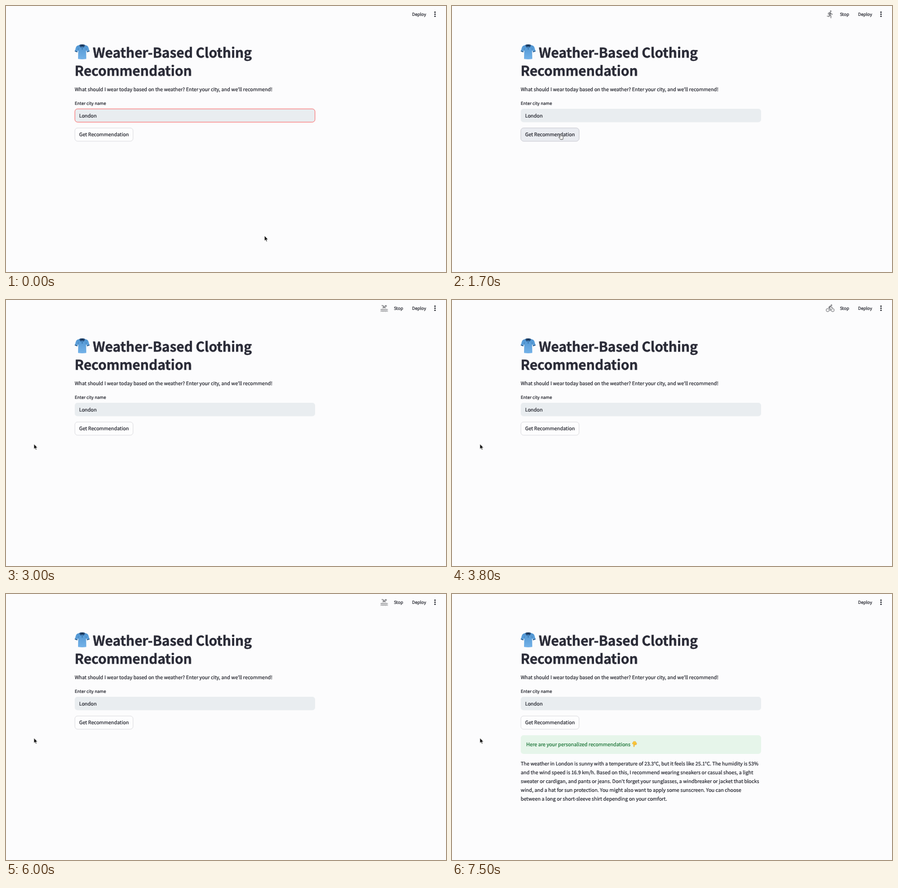
These frames come from a looping animation (800 by 484 pixels, 8000 ms). An HTML page:

```html
<!DOCTYPE html>
<html lang="en">
<head>
<meta charset="utf-8">
<title>Clothing Recommendation</title>
<style>
  html, body { margin: 0; width: 100%; height: 100%; overflow: hidden; background: #fcfcfd; }
  svg { display: block; width: 800px; height: 484px; }
  text {
    font: 8.91px "Noto Sans CJK JP", "Noto Sans CJK SC", "Noto Sans CJK", "Open Sans", sans-serif;
    fill: #1f2029;
    stroke: #1f2029;
    stroke-width: .2px;
    text-rendering: geometricPrecision;
    white-space: pre;
  }
  .title text {
    font-size: 24.6px; font-weight: 700; letter-spacing: -.005em;
    fill: #292a36; stroke: #292a36; stroke-width: .4px;
  }
  .small { font-size: 7.8px; }
  .note { fill: #177233; stroke: #177233; }

  /* One loop is 8 s, so 1% is 80 ms. */
  .focus, .press, .busy, .result, .arrow, .hand { animation: 8s step-end infinite; }
  .focus { animation-name: focus; }
  .press, .hand { animation-name: over; }
  .arrow { animation-name: away; }
  .busy { animation-name: busy; }
  .result { animation-name: result; }
  .pointer { animation: move 8s infinite; }
  .icon { fill: #707175; animation: flash .5s step-end calc(var(--slot) * 100ms - 530ms) infinite; }

  @keyframes focus { 0% { opacity: 1 } 15.9%, 100% { opacity: 0 } }
  @keyframes over { 0% { opacity: 0 } 12.5% { opacity: 1 } 26.7%, 100% { opacity: 0 } }
  @keyframes away { 0% { opacity: 1 } 12.5% { opacity: 0 } 26.7%, 100% { opacity: 1 } }
  @keyframes busy { 0% { opacity: 0 } 19.6% { opacity: 1 } 88.4%, 100% { opacity: 0 } }
  @keyframes result { 0% { opacity: 0 } 88.4%, 100% { opacity: 1 } }
  @keyframes flash { 0% { opacity: 1 } 20%, 100% { opacity: 0 } }
  @keyframes move {
    0%, 1.25% { transform: translate(470px, 418px); animation-timing-function: ease-in-out }
    14.4%, 22.5% { transform: translate(196.5px, 233px); animation-timing-function: ease-in-out }
    31.25%, 100% { transform: translate(50.8px, 262px) }
  }
</style>
</head>
<body>
<svg viewBox="0 0 800 484">
  <defs>
    <linearGradient id="cloth" x1="0" y1="0" x2="0" y2="1">
      <stop offset="0" stop-color="#4f95d2"/>
      <stop offset="1" stop-color="#74b2e8"/>
    </linearGradient>
    <path id="bike" d="M15.5 5.5c1.1 0 2-.9 2-2s-.9-2-2-2-2 .9-2 2 .9 2 2 2zM5 12c-2.8 0-5 2.2-5 5s2.2 5 5 5 5-2.2 5-5-2.2-5-5-5zm0 8.5c-1.9 0-3.5-1.6-3.5-3.5s1.6-3.5 3.5-3.5 3.5 1.6 3.5 3.5-1.6 3.5-3.5 3.5zm5.8-10l2.4-2.4.8.8c1.3 1.3 3 2.1 5.1 2.1V9c-1.5 0-2.7-.6-3.6-1.5l-1.9-1.9c-.5-.4-1-.6-1.6-.6s-1.1.2-1.4.6L7.8 8.4c-.4.4-.6.9-.6 1.4 0 .6.2 1.1.6 1.4L11 14v5h2v-6.2l-2.2-2.3zM19 12c-2.8 0-5 2.2-5 5s2.2 5 5 5 5-2.2 5-5-2.2-5-5-5zm0 8.5c-1.9 0-3.5-1.6-3.5-3.5s1.6-3.5 3.5-3.5 3.5 1.6 3.5 3.5-1.6 3.5-3.5 3.5z"/>
    <path id="wave" d="M2 17c1.7 0 1.7-1 3.3-1s1.7 1 3.4 1 1.6-1 3.3-1 1.7 1 3.3 1 1.7-1 3.4-1 1.6 1 3.3 1" fill="none" stroke="#707175" stroke-width="1.9"/>
  </defs>

  <!-- Toolbar -->
  <text class="small" x="738.3" y="18">Deploy</text>
  <g fill="#1f2029">
    <circle cx="780" cy="11.3" r="1.3"/>
    <circle cx="780" cy="15" r="1.3"/>
    <circle cx="780" cy="18.7" r="1.3"/>
  </g>
  <g class="busy">
    <text class="small" x="705.2" y="18">Stop</text>
    <g transform="translate(679.8 7.2) scale(.65)">
      <g class="icon" style="--slot:0">
        <circle cx="16.5" cy="5.5" r="2.5"/>
        <path d="M10 8l-3.25 3.25c.31.12.56.27.77.39.37.23.59.36 1.15.36s.78-.13 1.15-.36c.46-.27 1.08-.64 2.19-.64s1.73.37 2.18.64c.37.22.6.36 1.15.36.55 0 .78-.13 1.15-.36.12-.07.26-.15.41-.23L10.48 5C8.93 3.45 7.5 2.99 5 3v2.5c1.82-.01 2.89.39 4 1.5l1 1z"/>
        <use href="#wave" y="-.8"/>
        <use href="#wave" y="3.7"/>
      </g>
      <use class="icon" style="--slot:1" href="#bike"/>
      <path class="icon" style="--slot:2" d="M13.49 5.48c1.1 0 2-.9 2-2s-.9-2-2-2-2 .9-2 2 .9 2 2 2zm-3.6 13.9l1-4.4 2.1 2v6h2v-7.5l-2.1-2 .6-3c1.3 1.5 3.3 2.5 5.5 2.5v-2c-1.9 0-3.5-1-4.3-2.4l-1-1.6c-.4-.6-1-1-1.7-1-.3 0-.5.1-.8.1l-5.2 2.2v4.7h2v-3.4l1.8-.7-1.6 8.1-4.9-1-.4 2 7 1.4z"/>
      <use class="icon" style="--slot:3" href="#bike"/>
      <path class="icon" style="--slot:4" d="M12 2c1.1 0 2 .9 2 2s-.9 2-2 2-2-.9-2-2 .9-2 2-2zm9 7h-6v13h-2v-6h-2v6H9V9H3V7h18v2z"/>
    </g>
  </g>

  <!-- Shirt -->
  <path d="M134 70.800Q138.500 74 143 70.800L147.300 72.200Q149.200 73 149.900 75.500L152 82.500L147.400 84.200L145.600 79.500L146 96.200Q138.500 97.800 131 96.200L131.400 79.500L129.600 84.200L125 82.500L127.100 75.500Q127.800 73 129.700 72.200Z" fill="url(#cloth)"/>
  <path d="M131.400 81V76.500M145.600 81V76.500" stroke="#3a77b0" stroke-width=".7" fill="none"/>
  <path d="M125.200 81.900L129.800 83.600M151.800 81.900L147.200 83.600" stroke="#24507f" stroke-width="1.300"/>
  <path d="M134.300 70.200Q138.500 69.200 142.700 70.200L143.600 72.200L141 75.700L138.500 73.600L136 75.700L133.400 72.200Z" fill="#254b78"/>
  <path d="M135.300 71Q138.500 70.200 141.700 71L138.500 73.600Z" fill="#173150"/>
  <path d="M138.500 73.800V79.500" stroke="#3670a8" stroke-width="1.300"/>

  <g class="title">
    <text x="157.700" y="94">Weather-Based Clothing</text>
    <text x="124.800" y="127">Recommendation</text>
  </g>
  <text x="125" y="155">What should I wear today based on the weather? Enter your city, and we'll recommend!</text>
  <text class="small" x="125" y="179.700">Enter city name</text>

  <!-- City field -->
  <rect x="125" y="187" width="437" height="24.500" rx="5" fill="#e9edf0"/>
  <rect class="focus" x="125.200" y="187.200" width="436.600" height="24.100" rx="5" fill="none" stroke="#ff4b4b" stroke-width=".8"/>
  <text x="133" y="202.500">London</text>

  <!-- Button -->
  <rect x="125.200" y="222" width="105.800" height="24" rx="5" fill="#fdfdfe" stroke="#d6d6da" stroke-width=".8"/>
  <rect class="press" x="125.200" y="222" width="105.800" height="24" rx="5" fill="#eaecf1" stroke="#c9cad2" stroke-width=".8"/>
  <text x="133" y="237.300">Get Recommendation</text>

  <g class="result">
    <rect x="125" y="257" width="437" height="34" rx="5" fill="#e6f5ea"/>
    <text class="note" x="135" y="277">Here are your personalized recommendations</text>
    <g fill="#fbc638" stroke="#d9982a" stroke-width=".35" stroke-linejoin="round">
      <path d="M329.800 268.200H333.800L334.300 269.800Q336.200 270.500 335.900 273Q335.500 274.600 334 274.300Q333 275 331.800 274.400V277.600Q330.900 279 330 277.600V273.600L327.800 272.600Q327.600 270.500 329.300 269.800Z"/>
      <path d="M331.800 271.800V274.400M333.900 271.800V274.300" fill="none"/>
    </g>
    <text x="125" y="312">The weather in London is sunny with a temperature of 23.3°C, but it feels like 25.1°C. The humidity is 53%</text>
    <text x="125" y="328">and the wind speed is 16.9 km/h. Based on this, I recommend wearing sneakers or casual shoes, a light</text>
    <text x="125" y="344">sweater or cardigan, and pants or jeans. Don't forget your sunglasses, a windbreaker or jacket that blocks</text>
    <text x="125" y="360">wind, and a hat for sun protection. You might also want to apply some sunscreen. You can choose</text>
    <text x="125" y="376">between a long or short-sleeve shirt depending on your comfort.</text>
  </g>

  <g class="pointer">
    <path class="arrow" d="M0 0V9.300L2.100 7.400L3.500 10.700L5 10.100L3.600 6.900H6.400Z" fill="#000" stroke="#fff" stroke-width=".7"/>
    <path class="hand" d="M-.6 .6Q.3-.5 1.200 .6L1.800 3.200Q2.700 2.500 3.200 3.400Q4.100 2.900 4.500 3.800Q5.500 3.500 5.700 4.600Q5.900 7.500 4.800 9.800H.8Q-.8 8-2.300 6Q-2.300 4.700-1 5.300L.1 6.100Z" fill="#fff" stroke="#222" stroke-width=".75" stroke-linejoin="round"/>
  </g>
</svg>
</body>
</html>
```
